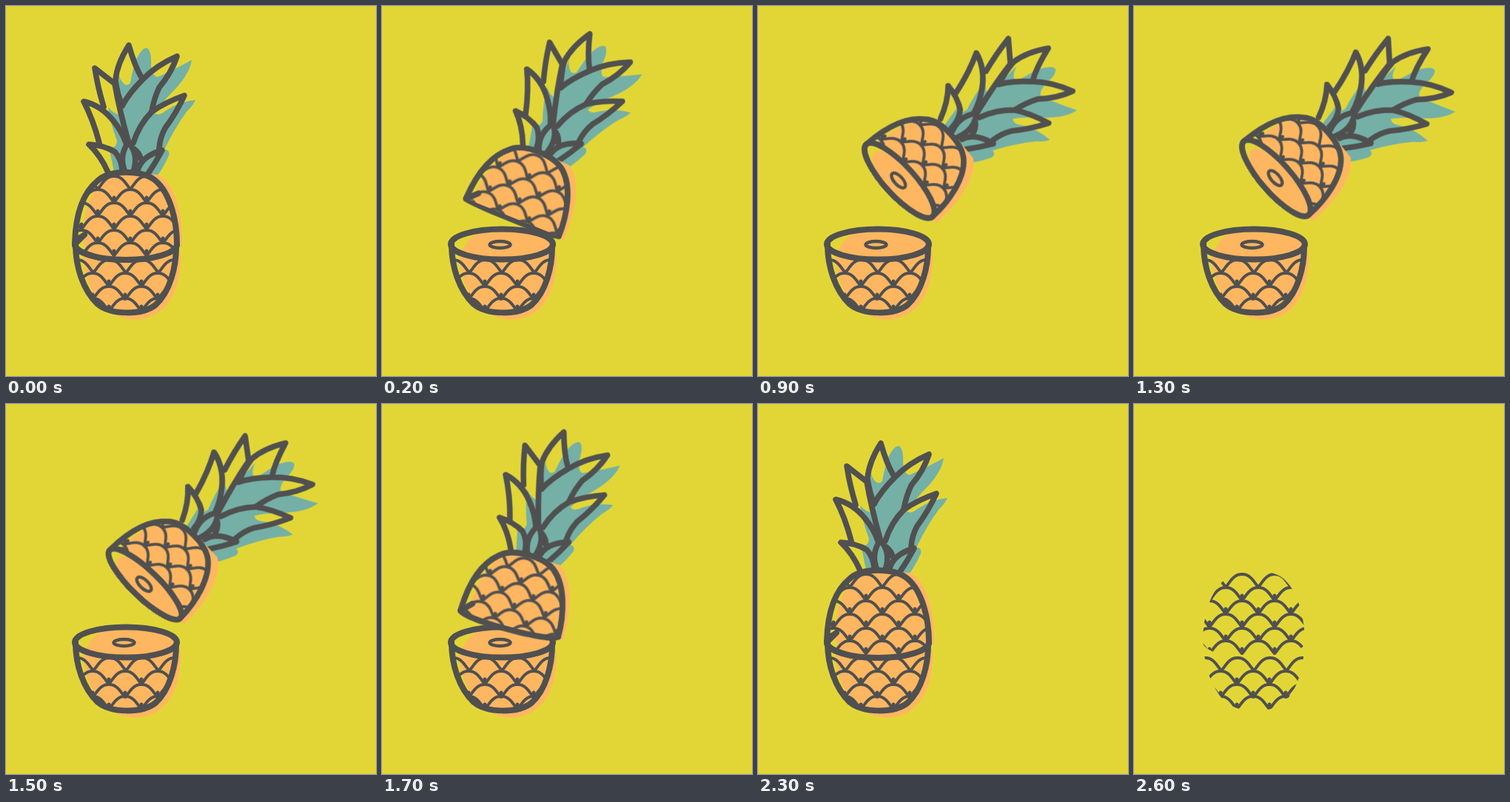
These frames come from a looping animation (500x500 px, 2700 ms). An HTML page without scripts:

```html
<!DOCTYPE html>
<html lang="en">
<head>
<meta charset="utf-8">
<title>Sliced pineapple</title>
<style>
  html, body { margin: 0; width: 100%; height: 100%; overflow: hidden; background: #e2d637; }
  svg { display: block; width: 100%; height: 100%; }

  .line { fill: none; stroke: #505050; stroke-width: 8; stroke-linecap: round; stroke-linejoin: round; }
  .leaf-line { stroke-width: 7.6; }
  .scales { fill: none; stroke: #505050; stroke-width: 4; stroke-linecap: round; }
  .hole { stroke-width: 4.5; }
  .flesh { fill: #ffb660; }
  .teal { fill: #74b0a6; }
  .bg { fill: #e2d637; }

  .top, .body, .slide, .rim, .face, .shade, .ink { animation: 2700ms step-end infinite; }
  .top { animation-name: hinge; transform-origin: 233px 325px; }
  .body { animation-name: shrink; transform-origin: 160px 322px; }
  .slide { animation-name: slide; }
  .rim { animation-name: tilt; ry: 21px; }
  .face { animation-name: reveal; }
  .shade { animation-name: drift; }
  .ink { animation-name: vanish; }

  @keyframes hinge {
    0%     { transform: translate(0, 0) rotate(0deg); }
    3.7%   { transform: translate(3px, -2px) rotate(5deg); }
    7.4%   { transform: translate(8px, -10px) rotate(22deg); }
    11.11% { transform: translate(6px, -25px) rotate(39deg); }
    14.81% { transform: translate(4px, -32px) rotate(46deg); animation-timing-function: steps(9); }
    48.14% { transform: translate(4px, -37px) rotate(48.7deg); }
    51.85% { transform: translate(4px, -37px) rotate(48.5deg); }
    55.55% { transform: translate(4px, -30px) rotate(44deg); }
    59.25% { transform: translate(7px, -18px) rotate(32deg); }
    62.96% { transform: translate(7px, -7px) rotate(15deg); }
    66.66%, 100% { transform: translate(0, 0) rotate(0deg); }
  }
  @keyframes shrink {
    0%     { transform: scale(1); }
    7.4%   { transform: scale(.98); }
    11.11% { transform: scale(.96); }
    62.96% { transform: scale(.99); }
    66.66%, 100% { transform: scale(1); }
  }
  @keyframes slide {
    0%     { transform: translateX(0); }
    7.4%   { transform: translateX(16px); }
    11.11% { transform: translateX(0); }
    62.96% { transform: translateX(16px); }
    66.66%, 100% { transform: translateX(0); }
  }
  @keyframes tilt {
    0%     { ry: 21px; }
    3.7%   { ry: 16px; }
    7.4%   { ry: 3px; }
    11.11% { ry: 15px; }
    14.81% { ry: 21px; }
    55.55% { ry: 19px; }
    59.25% { ry: 10px; }
    62.96% { ry: 8px; }
    66.66%, 100% { ry: 21px; }
  }
  @keyframes drift {
    0%     { transform: translate(0, 0); }
    7.4%   { transform: translate(1px, 4px); }
    11.11% { transform: translate(3px, 8px); }
    59.25% { transform: translate(2px, 6px); }
    62.96% { transform: translate(0, 4px); }
    66.66%, 100% { transform: translate(0, 0); }
  }
  @keyframes reveal {
    0% { visibility: hidden; }
    11.11% { visibility: visible; }
    62.96%, 100% { visibility: hidden; }
  }
  @keyframes vanish {
    0% { visibility: visible; }
    96.29%, 100% { visibility: hidden; }
  }
</style>
</head>
<body>
<svg viewBox="0 0 500 500">
  <defs>
    <path id="arch" d="M0 0C5-4 9-17 22-17S39-4 44 0"/>
    <g id="wave">
      <use href="#arch" x="-44"/><use href="#arch"/><use href="#arch" x="44"/><use href="#arch" x="88"/>
    </g>
    <g id="row">
      <use href="#wave"/>
      <path d="M0-1v-5m44 5v-5m44 5v-5" stroke-width="5"/>
    </g>
    <path id="dome" d="M93 320C94 285 102 254 124 236C140 221 184 221 202 236C222 253 231 290 231 322"/>
    <path id="bowl" d="M94 322C94 352 104 384 124 403C142 418 184 418 202 404C222 386 230 352 230 325"/>
    <clipPath id="in-dome">
      <use href="#dome"/>
      <ellipse class="rim" cx="162" cy="322" rx="69" ry="21"/>
    </clipPath>
    <clipPath id="in-bowl"><use href="#bowl"/></clipPath>
  </defs>

  <!-- lower half -->
  <g class="ink">
    <path class="flesh" d="M128 307C150 299 212 302 232 318L236 340C236 384 218 422 176 424C134 424 108 384 104 342Q110 320 128 307Z"/>
  </g>
  <g class="scales" clip-path="url(#in-bowl)">
    <use href="#wave" x="118" y="360"/>
    <use href="#row" x="95" y="378"/>
    <use href="#row" x="117" y="396"/>
    <use href="#row" x="95" y="412"/>
  </g>
  <g class="ink line">
    <use href="#bowl"/>
    <ellipse cx="162" cy="322" rx="69" ry="20.5"/>
    <ellipse class="hole" cx="159.500" cy="322.500" rx="14" ry="4.500"/>
  </g>

  <!-- upper half -->
  <g class="top">
    <g class="ink">
      <path class="teal shade" d="M146 224L139 190Q149 194 150 182Q142 162 138 137Q146 146 154 147L152 93Q160 113 168 104Q171 85 177 70Q185 55 191 57Q197 61 196 80Q199 99 207 95Q231 84 251 73Q248 94 222 119Q206 136 201 145Q207 149 215 142Q234 129 256 127Q253 134 244 143Q229 163 214 194Q222 194 220 202Q211 222 203 231Z"/>
      <g class="line leaf-line">
        <path d="M157 135Q150 118 148 100Q150 78 166 53Q174 82 184 98"/>
        <path d="M157 135Q166 118 184 100Q203 80 231 68Q224 90 207 110Q200 125 197 142"/>
        <path d="M132 136Q124 110 120 84Q134 95 147 105Q153 140 165 182"/>
        <path d="M126 185Q118 154 105 129Q128 134 145 155Q157 170 162 185"/>
        <path d="M172 185Q180 160 197 143Q215 130 241 121Q230 145 215 165Q208 178 207 192"/>
        <path d="M138 225Q128 202 112 187Q132 188 147 197Q156 207 157 222"/>
        <path d="M165 184Q152 204 161 224M165 184Q180 200 172 224M173 193Q180 198 182 206"/>
        <path d="M178 222Q183 203 211 195Q202 212 191 228"/>
      </g>
      <ellipse class="flesh rim" cx="169" cy="322" rx="62" ry="21"/>
      <path class="flesh" d="M105 323C103 290 108 255 134 232L160 226L207 228C229 242 239 280 238 325L228 323Z"/>
      <ellipse class="line rim body" cx="162" cy="322" rx="69" ry="21" visibility="hidden"/>
    </g>
    <g class="body">
      <g class="ink">
        <path class="line" d="M93 322L106 309"/>
      </g>
      <g class="scales" clip-path="url(#in-dome)">
        <g class="slide">
          <use href="#wave" x="124" y="247"/>
          <use href="#row" x="102" y="265"/>
          <use href="#row" x="124" y="283"/>
          <use href="#row" x="102" y="301"/>
          <use href="#row" x="124" y="320"/>
          <use href="#row" x="102" y="337"/>
        </g>
      </g>
      <g class="ink">
        <svg y="322" width="500" height="178" viewBox="0 322 500 178">
          <ellipse class="line rim" cx="162" cy="322" rx="69" ry="21"/>
        </svg>
      </g>
      <g class="face">
        <ellipse class="bg rim" cx="162" cy="322" rx="69" ry="21"/>
        <ellipse class="flesh rim" cx="170" cy="322" rx="61" ry="21"/>
        <ellipse class="line rim" cx="162" cy="322" rx="69" ry="21"/>
        <ellipse class="line hole" cx="161" cy="323" rx="13" ry="6"/>
      </g>
      <use class="ink line" href="#dome"/>
    </g>
  </g>
</svg>
</body>
</html>
```
